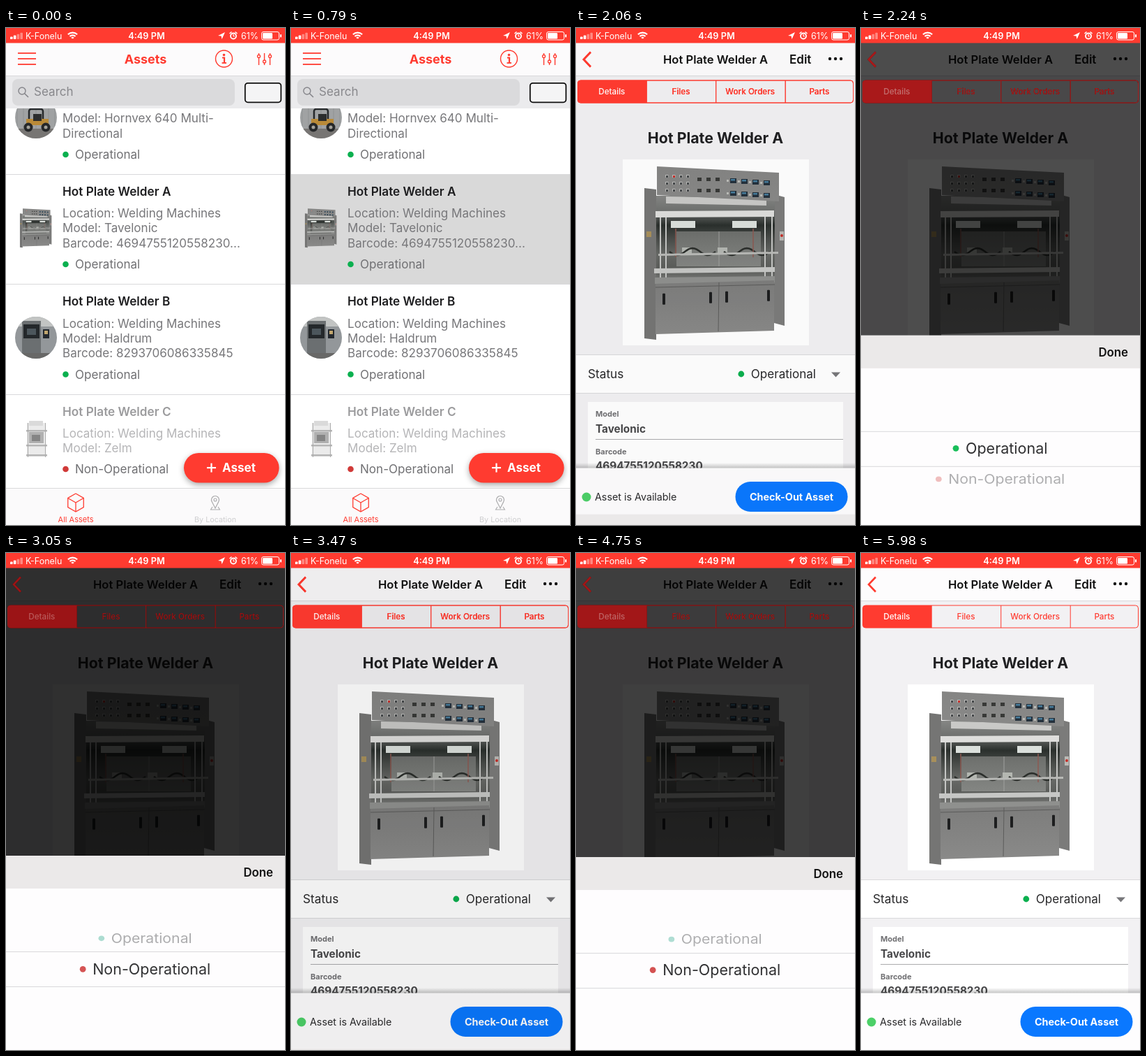
These frames come from a looping animation (400x711 px, 8.24 s). An HTML page with a canvas:

```html
<!DOCTYPE html>
<html lang="en">
<head>
<meta charset="utf-8">
<title>Asset status</title>
<style>
html, body { margin: 0; width: 100%; height: 100%; overflow: hidden; background: #fff; }
canvas { display: block; width: 400px; height: 711px; }
</style>
</head>
<body>
<canvas id="stage"></canvas>
<script>
const W = 400, H = 711, LOOP = 8240;
const RED = '#ff3b30', GREEN = '#0bb04f', ALERT = '#d03a38';
const PAGE = '#f2f1f3', RULE = '#d9d9db', INK = '#111', GREY = '#77777a';
const BODY = 17.07;
const STEP = 60, PHASES = [0, 790, 1050, 2000, 2810, 4510, 5370];
const canvas = document.getElementById('stage');
const c = canvas.getContext('2d');
const dpr = window.devicePixelRatio || 1;
canvas.width = W * dpr;
canvas.height = H * dpr;

// ---- helpers ----
const clamp = v => Math.max(0, Math.min(1, v));
const mix = (a, b, p) => `rgb(${a.map((v, i) => Math.round(v + (b[i] - v) * p))})`;

function times(n, fn) {
  for (let i = 0; i < n; i++) fn(i);
}
function spring(t, start, rate = 29) {
  const x = Math.max(0, t - start) / 1000 * rate;
  return 1 - (1 + x) * Math.exp(-x);
}
function fade(y0, y1, ...colors) {
  const g = c.createLinearGradient(0, y0, 0, y1);
  colors.forEach((color, i) => g.addColorStop(i / (colors.length - 1), color));
  return g;
}
function rect(x, y, w, h, color) {
  c.fillStyle = color;
  c.fillRect(x, y, w, h);
}
function stroke(color, width) {
  c.strokeStyle = color;
  c.lineWidth = width;
  c.stroke();
}
function round(x, y, w, h, r, fill, edge, width = 1) {
  c.beginPath();
  c.roundRect(x, y, w, h, r);
  if (fill) { c.fillStyle = fill; c.fill(); }
  if (edge) stroke(edge, width);
}
function dot(x, y, r, color) {
  c.fillStyle = color;
  c.beginPath();
  c.arc(x, y, r, 0, 7);
  c.fill();
}
function ring(x, y, r, color, width, from = 0, to = 7) {
  c.beginPath();
  c.arc(x, y, r, from, to);
  stroke(color, width);
}
function line(color, width, ...pts) {
  c.beginPath();
  for (let i = 0; i < pts.length; i += 2) c.lineTo(pts[i], pts[i + 1]);
  stroke(color, width);
}
// A box whose right side drops by `tilt`.
function slab(x, y, w, h, color, tilt = 0) {
  c.fillStyle = color;
  c.beginPath();
  c.moveTo(x, y);
  c.lineTo(x + w, y + tilt);
  c.lineTo(x + w, y + tilt + h);
  c.lineTo(x, y + h);
  c.fill();
}
function text(s, x, y, size, color, weight = 400, align = 'left') {
  c.font = `${weight} ${size}px Inter, Roboto, sans-serif`;
  c.textAlign = align;
  c.fillStyle = color;
  c.fillText(s, x, y);
}
function layer(draw) {
  c.save();
  draw();
  c.restore();
}

// ---- status bar ----
function statusBar() {
  const white = '#fff';
  rect(0, 0, W, 21.5, RED);
  times(4, i => {
    const h = 3.5 + i * 1.9;
    round(6 + i * 4.8, 16 - h, 3.6, h, 0.8, i < 2 ? white : 'rgba(255,255,255,.4)');
  });
  text('K-Fonelu', 28, 15.5, 12.5, white);
  times(3, i => ring(95.5, 16, 2 + i * 3.7, white, 2.2, -2.35, -0.79));
  text('4:49 PM', 201.5, 15.5, 12.8, white, 600, 'center');
  c.fillStyle = white;
  c.fill(new Path2D('M304 11L314 6L309.5 16L308.6 11.6Z'));
  ring(326, 11.5, 4, white, 1.8);
  for (const side of [-1, 1]) line(white, 1.6, 326 + side * 5.5, 8, 326 + side * 2.5, 5.5);
  line(white, 1.1, 326, 9, 326, 11.8, 328, 11.8);
  text('61%', 337, 15.5, 12.5, white);
  round(366.5, 5.5, 25, 11.5, 2.5, null, white);
  round(368, 7, 14, 8.5, 1.2, white);
  round(393, 9, 2, 4.5, 1, white);
}

// ---- the welding machine, in picture coordinates ----
function machine() {
  const shell = fade(198, 440, '#858584', '#8b8b8a', '#7c7c7b', '#8a8a89');
  const steel = '#c6c7c5', dark = '#343634';
  slab(98, 229, 17, 215, '#757574', 2);
  slab(284, 238, 15, 184, '#7b7b7a', 4);

  // chamber with its ceiling lights and back wall
  slab(115, 240, 170, 126, fade(240, 366, '#858684', '#707270', '#2b302d', '#4b4e4b', '#676966', '#5a5c59', '#80817f'));
  slab(144, 291, 121, 50, fade(291, 341, '#6d6f6c', '#848683'));
  for (const x of [136, 224]) slab(x, 276, 35, 10, '#dbe0dc');
  line('#a0a19f', 1, 205, 291, 205, 341);
  for (const x of [152, 203]) rect(x, 314, 14, 9, '#b4b7b1');
  for (const x of [134, 212]) {
    c.beginPath();
    for (let d = 0; d <= 66; d += 3) c.lineTo(x + d, 320 + 5 * Math.sin(d / 7));
    stroke('#2b2e2b', 2.5);
  }
  for (const x of [143, 254]) line('#8e5a52', 1.5, x, 287, x, 328);
  for (const x of [121, 129, 271, 281]) line(steel, 2, x, 268, x, 360);

  // rails
  slab(129, 241, 144, 10, '#c9c9c7', 3);
  slab(114, 262, 170, 9, '#dededc', -1);
  slab(118, 323, 172, 3, '#b9bab7', -3);
  slab(112, 344, 173, 7, steel, -2);
  slab(113, 357, 172, 9, '#8f908e', -2);

  // cabinet
  slab(114, 366, 170, 72, shell, -5);
  line('#5c5c5b', 1, 205, 364, 204, 434);
  line('#5c5c5b', 1, 114, 371, 285, 367);
  for (const x of [124, 191, 214, 274]) round(x, 384 - x / 30, 4, 16, 1, '#1d1e1f');

  // control panel
  slab(116, 198, 175, 41, shell, 9);
  times(12, i => {
    const x = 130 + i % 4 * 10, y = 212 + Math.floor(i / 4) * 10;
    rect(x - 2, y - 2, 4.5, 4, '#bdbdbb');
    rect(x - 1, y - 1, 3, 3, i === 1 ? '#c5322d' : '#45484a');
  });
  times(6, i => rect(174 + i % 3 * 13, i < 3 ? 214 : 230, 6, 5, '#383937'));
  times(8, i => {
    const x = 221 + i % 4 * 16, y = (i < 4 ? 215 : 233) + i % 4;
    rect(x, y, 9, 7, '#24303b');
    rect(x + 1, y + 1, 6, 2.5, '#477d9d');
    rect(x - 5, y + 2, 3, 3, '#bdbeba');
  });
  rect(101, 291, 7, 8, '#a8905a');
  rect(292, 291, 6, 13, '#bab9b5');
  dot(295, 297, 2, '#c52d28');
}

// ---- asset list ----
function circlePhoto(y, bg, draw) {
  layer(() => {
    c.translate(43, y);
    c.beginPath();
    c.arc(0, 0, 30, 0, 7);
    c.clip();
    rect(-30, -30, 60, 60, bg);
    draw();
  });
}
function loaderPhoto() {
  rect(-30, 16, 60, 14, '#777573');
  times(7, i => line('#8f9293', 1, i * 9 - 27, -30, i * 9 - 27, 16));
  round(-10, -12, 20, 18, 3, null, '#25282a', 2.5);
  slab(-14, 2, 32, 9, '#b98a38');
  rect(-4, -5, 12, 10, '#2b2d2d');
  for (const x of [-11, 14]) {
    dot(x, 14, 6.5, '#252729');
    dot(x, 14, 2.5, '#a4a29b');
  }
}
function cabinetPhoto() {
  rect(-30, -30, 60, 14, '#c2c4c3');
  rect(-20, -24, 27, 46, '#6b6f71');
  rect(-18, -19, 23, 20, '#24282b');
  rect(-13, -13, 13, 9, '#4c565c');
  rect(10, -12, 9, 13, '#23282e');
  rect(12, -10, 5, 5, '#c2a66e');
  rect(-30, 22, 60, 8, '#686867');
}
function pressPhoto() {
  rect(30, 565, 27, 48, '#ebebeb');
  rect(33, 562, 20, 7, '#dadada');
  rect(33, 578, 21, 16, '#b0b0b0');
  rect(37, 582, 12, 9, '#858585');
  for (const y of [575, 596, 610]) rect(29, y, 30, 2.5, '#b5b5b5');
  for (const x of [31, 56]) rect(x, 565, 1, 49, '#aaa');
}
function row(top, title, lines, status, faded) {
  const base = top + (lines.length > 2 ? 135 : 113);
  text(title, 81, top + 30.5, 17.2, faded ? '#9b9b9d' : '#1d1d1f', 600);
  lines.forEach((s, i) => text(s, 81, top + 62 + i * 21.4, BODY, faded ? '#b5b5b7' : GREY));
  dot(85.5, base - 6, 4.3, faded ? ALERT : GREEN);
  text(status, 99, base, BODY, '#707073');
}
function listRows(pressed) {
  const place = 'Location: Welding Machines';
  if (pressed) rect(0, 209.5, W, 157, '#d9d9d9');
  circlePhoto(128, '#a0a2a3', loaderPhoto);
  layer(() => {
    c.translate(43, 286);
    c.scale(0.226, 0.226);
    c.translate(-200, -321);
    machine();
  });
  circlePhoto(443, '#93979a', cabinetPhoto);
  pressPhoto();
  row(52, '', ['', 'Model: Hornvex 640 Multi-', 'Directional'], 'Operational');
  row(209, 'Hot Plate Welder A', [place, 'Model: Tavelonic', 'Barcode: 4694755120558230...'], 'Operational');
  row(366.5, 'Hot Plate Welder B', [place, 'Model: Haldrum', 'Barcode: 8293706086335845'], 'Operational');
  row(524, 'Hot Plate Welder C', [place, 'Model: Zelm'], 'Non-Operational', true);
  for (const y of [209, 366, 524]) rect(0, y, W, 1, RULE);
}
function listHeader() {
  rect(0, 21, W, 47, '#fcfbfc');
  for (const y of [36, 44, 52]) line(RED, 1.8, 17, y, 43, y);
  text('Assets', 200, 51, 18, RED, 700, 'center');
  ring(312.5, 44, 12, RED, 1.4);
  dot(312.5, 38.5, 1.8, RED);
  line(RED, 2.2, 310, 42.5, 313, 42.5, 313, 50);
  line(RED, 1.8, 309.5, 50, 316, 50);
  times(3, i => {
    const x = 362.5 + i * 8;
    line(RED, 1.4, x, 36, x, 53);
    round(x - 2, i === 1 ? 46 : 38.5, 4, 4, 2, '#fff', RED, 1.3);
  });

  rect(0, 68, W, 47, '#ebebed');
  rect(0, 68, W, 1, RULE);
  round(9, 73, 319, 38, 8, '#dadadc');
  ring(23, 90, 5, '#85858a', 1.4);
  line('#85858a', 1.6, 26.7, 93.7, 32, 99);
  text('Search', 40, 97, BODY, '#88888c');
  round(342.8, 78.8, 51.5, 27.5, 4, '#f4f4f5', INK, 1.8);
}
function listFooter() {
  layer(() => {
    c.shadowColor = 'rgba(0,0,0,.35)';
    c.shadowBlur = 8 * dpr;
    c.shadowOffsetY = 3 * dpr;
    round(255, 608, 136.5, 42.5, 21.2, RED);
  });
  rect(288, 628, 13, 2.2, '#fff');
  rect(293.4, 622.6, 2.2, 13, '#fff');
  text('Asset', 310, 635.3, 17, '#fff', 700);

  rect(0, 658, W, 53, '#fbfafb');
  rect(0, 658, W, 1, RULE);
  c.beginPath();
  times(7, i => c.lineTo(100 + 13 * Math.sin(i * Math.PI / 3), 679 - 13 * Math.cos(i * Math.PI / 3)));
  stroke(RED, 1.3);
  for (const a of [1, 3, 5]) line(RED, 1.3, 100, 679, 100 + 13 * Math.sin(a * Math.PI / 3), 679 - 13 * Math.cos(a * Math.PI / 3));
  text('All Assets', 100, 707, 11, RED, 400, 'center');
  const pale = '#acacae';
  c.beginPath();
  c.arc(300, 675, 5.5, 2.65, 0.5);
  c.lineTo(300, 687);
  c.closePath();
  stroke(pale, 1.2);
  ring(300, 675, 2, pale, 1.1);
  line(pale, 1.1, 296, 685, 293.5, 689, 306.5, 689, 304, 685);
  text('By Location', 300, 707, 10.8, '#cfcfd1', 400, 'center');
}
function listPage(pressed) {
  rect(0, 0, W, H, '#fff');
  listRows(pressed);
  listHeader();
  listFooter();
}

// ---- asset details ----
// Red controls stay visible through the dimmed backdrop.
function redControls(dim) {
  const red = mix([255, 59, 48], [155, 20, 22], dim);
  const label = mix([255, 255, 255], [185, 90, 90], dim);
  line(red, 2.6, 21, 34.5, 11, 45, 21, 55.5);
  round(2.5, 75, 98.5, 32, [4, 0, 0, 4], red);
  round(2.5, 75, 395, 32, 4, null, red);
  ['Details', 'Files', 'Work Orders', 'Parts'].forEach((s, i) => {
    if (i) rect(1.2 + i * 99.5, 75, 1, 32, red);
    text(s, 51.3 + i * 99.2, 95.3, 11.7, i ? red : label, 500, 'center');
  });
}
function statusRow(broken) {
  const status = broken ? 'Non-Operational' : 'Operational';
  rect(0, 467, W, 56, '#fff');
  for (const y of [467, 522]) rect(0, y, W, 1, RULE);
  text('Status', 17, 500.7, 17.2, '#29292b');
  text(status, 344, 500.7, BODY, '#29292b', 400, 'right');
  dot(344 - c.measureText(status).width - 14, 495, 4.4, broken ? ALERT : GREEN);
  c.fillStyle = GREY;
  c.fill(new Path2D('M366 492.5h13l-6.5 7Z'));
}
function field(label, value, y) {
  text(label, 28, y, 11, '#707073', 700);
  text(value, 28, y + 22.8, 15.3, '#48484a', 700);
  rect(28, y + 31.7, 355, 1, '#ababad');
}
function detailsPage(broken, haze) {
  rect(0, 0, W, H, PAGE);
  rect(0, 21, W, 47, '#fdfcfd');
  rect(0, 68, W, 1, RULE);
  text('Hot Plate Welder A', 200, 51, 16.6, INK, 600, 'center');
  text('Edit', 306, 51, 17, INK, 600);
  times(3, i => dot(364 + i * 8, 44, 2.2, INK));
  redControls(0);

  text('Hot Plate Welder A', 200, 165, 21.3, '#1f1f21', 700, 'center');
  rect(67, 188, 267, 266, '#fff');
  machine();
  if (haze > 0) layer(() => {
    c.globalAlpha = haze;
    c.filter = 'blur(3px)';
    round(164, 284, 72, 80, 16, '#8b8c89');
  });

  statusRow(broken);
  rect(17, 535, 366, 100, '#fff');
  field('Model', 'Tavelonic', 556.3);
  field('Barcode', '4694755120558230', 609.5);

  rect(0, 622, W, 8, fade(622, 630, 'rgba(0,0,0,0)', 'rgba(0,0,0,.24)'));
  rect(0, 629.5, W, 82, '#fefdfe');
  dot(15, 671, 6.5, '#4cd068');
  text('Asset is Available', 27, 676, 14.3, '#2a2a2c');
  round(228.5, 649, 161, 43, 21.5, '#0a78ff');
  text('Check-Out Asset', 309, 676, 14.4, '#fff', 700, 'center');
}

// ---- status picker ----
function option(name, pale, vivid, offset, mid) {
  const far = clamp(Math.abs(offset));
  layer(() => {
    c.translate(208.7, mid + offset * 44);
    c.scale(1 - far * 0.012, 1 - far * 0.12);
    text(name, 0, 7.8, 21.5, mix([48, 48, 50], [174, 174, 176], far), 400, 'center');
    dot(-c.measureText(name).width / 2 - 14, 0, 4.4, mix(vivid, pale, far));
  });
}
function picker(top, pos) {
  rect(0, top, W, H, '#fefdfe');
  rect(0, top, W, 47, '#ebe9e9');
  text('Done', 383, top + 30, 16.8, INK, 600, 'right');
  for (const y of [137, 187]) rect(0, top + y, W, 1, RULE);
  option('Operational', [175, 221, 211], [25, 190, 90], -pos, top + 161.5);
  option('Non-Operational', [240, 190, 190], [212, 82, 82], 1 - pos, top + 161.5);
}

// ---- timeline ----
function openness(t, rate) {
  return spring(t, 2047, rate) - spring(t, 3230, rate) + spring(t, 4510, rate) - spring(t, 5540, rate);
}
function draw(raw) {
  const start = PHASES.filter(s => s <= raw).pop();
  const t = start + Math.floor((raw - start) / STEP) * STEP;
  c.setTransform(dpr, 0, 0, dpr, 0, 0);

  const push = t < 1050 ? 0 : spring(t, 1010);
  if (push < 0.999) layer(() => {
    c.translate(-132 * push, 0);
    listPage(t >= 790);
  });
  if (push > 0) layer(() => {
    const x = W * (1 - push);
    c.translate(x < 0.5 ? 0 : x, 0);
    detailsPage(t >= 3650 && t < 5910, 0.85 * clamp((1540 - t) / 250));
  });

  const open = openness(t, 29);
  const dim = openness(t, 18);
  if (dim > 0.004) {
    rect(0, 21, W, H, `rgba(0,0,0,${0.81 * dim})`);
    redControls(dim);
  }
  if (open > 0.002) picker(H - 278 * open, spring(t, 2780, 22) - spring(t, 5020, 22));
  statusBar();
}

const begin = performance.now();
function frame() {
  draw((performance.now() - begin) % LOOP);
  requestAnimationFrame(frame);
}
frame();
</script>
</body>
</html>
```
